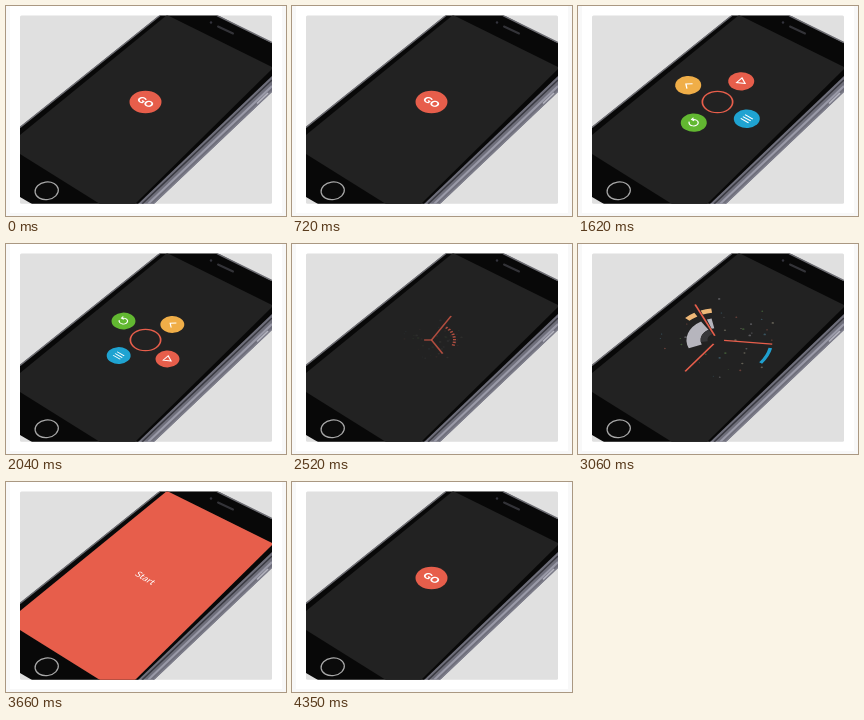
Write an HTML page that moves like this. It is 280x210 px and loops after 4.5 s.

```html
<!DOCTYPE html>
<html lang="en">
<head>
<meta charset="utf-8">
<title>Go menu</title>
<style>
html, body { margin: 0; width: 100%; height: 100%; overflow: hidden; background: #fff; }
svg { display: block; width: 100vw; height: 100vh; }
text { font-family: Lato, Inter, sans-serif; text-anchor: middle; fill: #fff; }
.icon { fill: none; stroke: #fff; stroke-width: 1.3; }
</style>
</head>
<body>
<svg viewBox="0 0 280 210">
  <defs>
    <clipPath id="photo"><rect x="14" y="9.6" width="252" height="188.2" rx="1.5"/></clipPath>
    <clipPath id="screen"><path d="M161 9L266 61V63L129 198H94L14 148V129Z"/></clipPath>
  </defs>
  <rect width="280" height="210" fill="#f8f8f8"/>
  <rect x="4" width="272" height="207" fill="#fff"/>
  <g clip-path="url(#photo)">
    <rect x="14" y="9" width="252" height="189" fill="#e0e0e0"/>
    <path d="M266 68V86L148 198H130Z" fill="#6f6f7b"/>
    <path d="M266 74L136 198" stroke="#3a3a42" stroke-width="1.6"/>
    <path d="M266 80L142 198" stroke="#9a9aa8" stroke-width="2"/>
    <path d="M266 85L147 198" stroke="#7d7d8a" stroke-width="1.4"/>
    <path d="M262 87L251 97.5" stroke="#b5b5c0" stroke-width="1.6"/>
    <path d="M14 121L154 9H211L266 37V70L132 198H26L14 191Z" fill="#080808"/>
    <path d="M14 121.5L154 9.5M211 9.5L266 36.5" stroke="#6c6c72" stroke-width="1.4"/>
    <path d="M161 9L266 61V63L129 198H94L14 148V129Z" fill="#222"/>
    <path d="M212 20.5L227 27.5" stroke="#333338" stroke-width="2" stroke-linecap="round"/>
    <circle cx="205" cy="16.5" r="1.2" fill="#33333c"/>
    <ellipse cx="40.7" cy="184.8" rx="11.7" ry="8.8" transform="rotate(-8 40.7 184.8)" fill="#0b0b0b" stroke="#a8a8a8" stroke-width="1.2"/>
    <g clip-path="url(#screen)">
      <g id="plane" transform="translate(139.5 96) scale(1 .706)"></g>
    </g>
  </g>
</svg>
<script>
const LOOP = 4500, TILT = 39, RED = '#e75e4b', FULL = 160, BUTTON = 16;
const plane = document.getElementById('plane');

const clamp = x => Math.max(0, Math.min(1, x));
const span = (t, from, to) => clamp((t - from) / (to - from));
const mix = (a, b, p) => a + (b - a) * p;
const easeOut = p => 1 - (1 - p) ** 3;
const easeInOut = p => p * p * (3 - 2 * p);
const easeOutBack = p => 1 + 3.6 * (p - 1) ** 3 + 2.6 * (p - 1) ** 2;
const polar = (r, deg) => {
  const a = deg * Math.PI / 180;
  return [r * Math.cos(a), r * Math.sin(a)];
};
const arcPath = (r, from, to) =>
  `M${polar(r, from)}A${r} ${r} 0 ${to - from > 180 ? 1 : 0} 1 ${polar(r, to)}`;

function set(el, attrs) {
  for (const key in attrs) el.setAttribute(key, attrs[key]);
  return el;
}
function add(parent, tag, attrs = {}) {
  return parent.appendChild(set(document.createElementNS('http://www.w3.org/2000/svg', tag), attrs));
}
function label(content, size, weight) {
  const el = add(plane, 'text', { 'font-size': size, 'font-weight': weight, y: size * .36, transform: `rotate(${TILT})` });
  el.textContent = content;
  return el;
}

// Seeded sparks
let seed = 11;
const random = () => (seed = seed * 16807 % 2147483647) / 2147483647;
const sparkGroup = add(plane, 'g');
const sparkColors = ['#77777c', '#8d5147', '#4f7440', '#456e80', '#858070'];
const sparks = Array.from({ length: 38 }, (_, i) => ({
  angle: random() * 360,
  reach: 16 + random() * 46,
  el: add(sparkGroup, 'circle', { r: .6 + random() * .8, fill: sparkColors[i % 5] })
}));

// Arcs that turn together with the rays
const dial = add(plane, 'g', { fill: 'none' });
const arcs = [
  [24, 14, 158, 238, '#b6b5bd'],
  [24, 14, 250, 259, '#b6b5bd'],
  [13.5, 7, 170, 238, '#37373a'],
  [42, 6, 224, 239, '#edb777'],
  [42, 6, 248, 262, '#edb777'],
  [54, 3.6, 12, 37, '#1fa0cf']
].map(([r, width, from, to, stroke]) =>
  ({ r, from, to, el: add(dial, 'path', { stroke, 'stroke-width': width }) }));

const dashes = add(plane, 'path', { fill: 'none', stroke: RED, 'stroke-width': 3, 'stroke-dasharray': '1.8 2' });
const rays = [[-60, 2412], [60, 2470], [180, 2506]].map(([angle, start]) =>
  ({ angle, start, el: add(plane, 'line', { stroke: RED, 'stroke-width': 1.8 }) }));

const ring = add(plane, 'circle', { fill: 'none', stroke: RED });
const buttons = [
  [-51, RED, 'M5 0L-2.5 4.3V-4.3Z'],
  [39, '#1fa3d1', 'M-5 -3.4H5M-5 0H5M-5 3.4H5'],
  [129, '#62b831', 'M-3.5 -3A4.6 4.6 0 1 1 -4.4 1.8M-4.6 -5.3V-2.2H-1.4'],
  [219, '#f0ae48', 'M2 -4.5L-3 0L2 4.5']
].map(([angle, fill, icon], i) => {
  const el = add(plane, 'g');
  add(el, 'circle', { r: 13, fill });
  add(el, 'path', { d: icon, class: 'icon' });
  return { angle, start: 1035 + i * 27, el };
});
const flood = add(plane, 'circle', { fill: RED });
const go = label('GO', 11.5, 900);
const start = label('Start', 10.8, 400);

function drawCenter(t) {
  const hole = easeInOut(span(t, 780, 1020));
  const press = 1 - .1 * Math.sin(Math.PI * span(t, 720, 900));
  const radius = BUTTON * press * (1 - span(t, 2130, 2290) ** 2);
  const width = Math.min(mix(BUTTON, 1.7, hole), radius);
  set(ring, { r: Math.max(0, radius - width / 2), 'stroke-width': width, opacity: t < 2290 ? 1 : 0 });

  const grown = FULL * span(t, 3390, 3600) ** 1.5;
  const size = t < 4050 ? grown : mix(FULL, BUTTON, easeInOut(span(t, 4050, 4320)));
  set(flood, { r: size });
  set(start, { opacity: span(t, 3510, 3660) * (1 - span(t, 4050, 4170)) });
  set(go, { opacity: t < 2000 ? 1 - span(t, 750, 900) : span(t, 4170, 4320) });
}

function drawButtons(t) {
  const fold = span(t, 1770, 2280);
  for (const b of buttons) {
    const p = span(t, b.start, b.start + 450);
    const scale = Math.max(0, p ? easeOutBack(p) : 0) * (1 - fold ** 4);
    const [x, y] = polar(37.7 * scale, b.angle + 360 * fold ** 2);
    set(b.el, { transform: `translate(${x} ${y}) rotate(${TILT}) scale(${scale})` });
  }
}

function drawBurst(t) {
  const spin = -54 * easeInOut(span(t, 2550, 2880));
  const leave = span(t, 3060, 3360);
  const inner = 6.5 * (Math.max(0, t - 2820) / 240) ** 3;
  const glow = mix(.45, 1, span(t, 2400, 2640));
  for (const ray of rays) {
    const outer = 55 * easeOut(span(t, ray.start, ray.start + 320)) + 4 * leave;
    const [x1, y1] = polar(Math.min(inner, outer), ray.angle + spin);
    const [x2, y2] = polar(outer, ray.angle + spin);
    set(ray.el, { x1, y1, x2, y2, opacity: outer > inner ? glow : 0 });
  }

  const sweep = easeOut(span(t, 2400, 2520));
  set(dashes, {
    d: arcPath(23, mix(24, -51, sweep), 24),
    opacity: glow * span(t, 2400, 2430) * (1 - span(t, 2580, 2760))
  });

  const open = easeOut(span(t, 2760, 3030));
  set(dial, {
    transform: `rotate(${spin + 54}) scale(${1 + .1 * leave})`,
    opacity: span(t, 2760, 2820) * (1 - span(t, 3120, 3330))
  });
  for (const a of arcs) set(a.el, { d: arcPath(a.r, a.from, mix(a.from, a.to, open)) });

  set(sparkGroup, { opacity: .65 * span(t, 2430, 2940) * (1 - span(t, 3150, 3380)) });
  const spread = easeOut(span(t, 2310, 3360));
  for (const s of sparks) {
    const [cx, cy] = polar(s.reach * spread, s.angle + spin * .3);
    set(s.el, { cx, cy });
  }
}

function render(t) {
  drawButtons(t);
  drawBurst(t);
  drawCenter(t);
}

const origin = performance.now();
function tick() {
  render((performance.now() - origin) % LOOP);
  requestAnimationFrame(tick);
}
tick();
</script>
</body>
</html>
```
